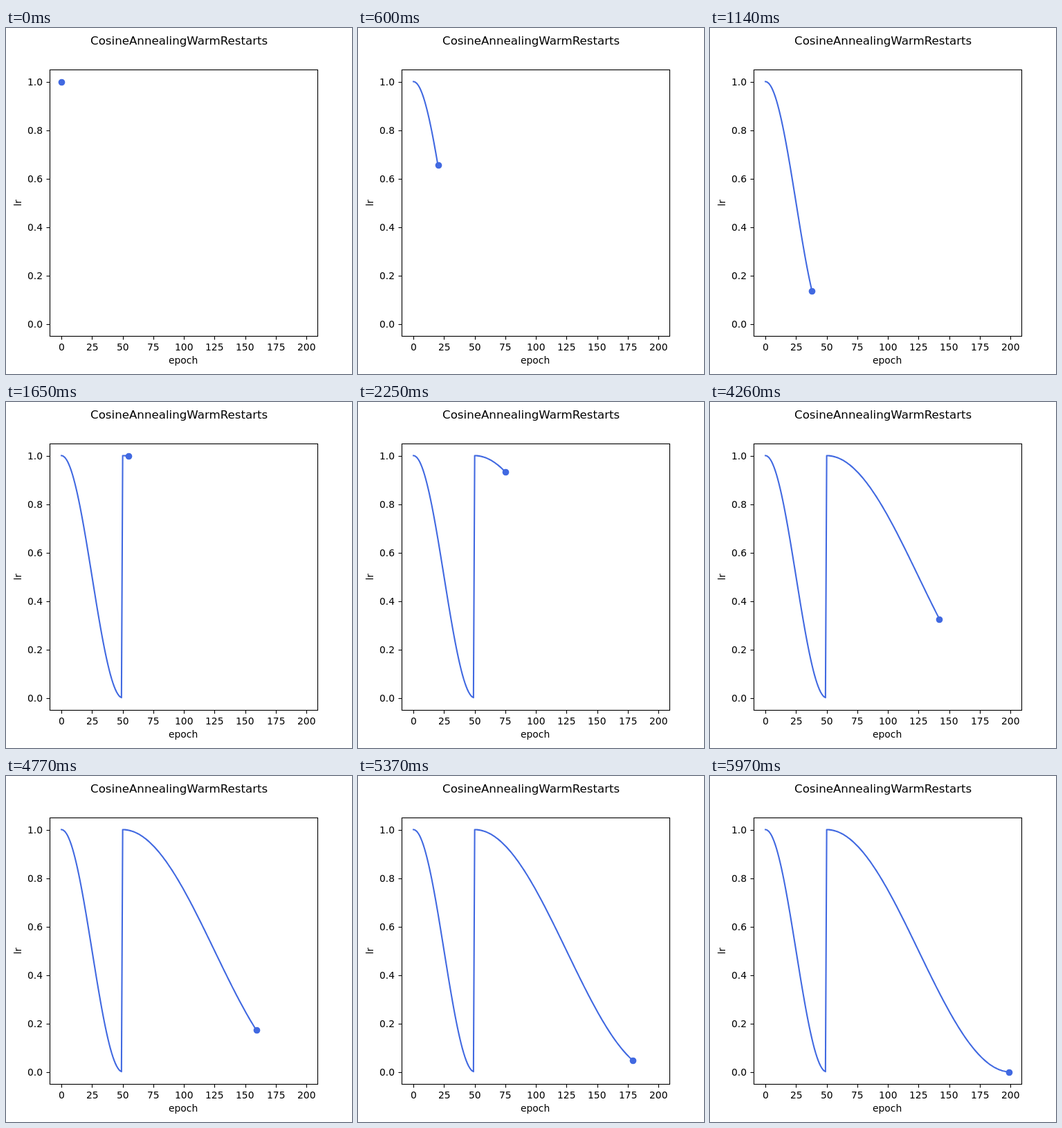
These frames come from a looping animation (500 px wide and 500 px high, 6 s). An HTML page with a canvas:

```html
<!DOCTYPE html>
<html lang="en">
<head>
<meta charset="utf-8">
<title>Learning rate schedule</title>
<style>
  html, body { margin: 0; width: 100%; height: 100%; overflow: hidden; background: #fff; }
  canvas { display: block; }
</style>
</head>
<body>
<canvas id="chart" width="500" height="500"></canvas>
<script>
const ctx = document.getElementById('chart').getContext('2d');
const EPOCHS = 200, STEP = 30, RESTART = 50, PT = 100 / 72;
const BLUE = '#4169e1';
const LEFT = 62.5, RIGHT = 450, TOP = 60, BOTTOM = 445;

// Cosine decay over 50 epochs, then a restart lasting 150
function rate(epoch) {
  const phase = epoch < RESTART ? epoch / RESTART : (epoch - RESTART) / 150;
  return (1 + Math.cos(Math.PI * phase)) / 2;
}

// Data limits plus a 5% margin on every side
const last = EPOCHS - 1, lowest = rate(last);
const px = epoch => LEFT + (RIGHT - LEFT) * (epoch / last + 0.05) / 1.1;
const py = lr => TOP + (BOTTOM - TOP) * ((1 - lr) / (1 - lowest) + 0.05) / 1.1;
const snap = v => Math.floor(v + 0.5 + 1e-6) + 0.5;

// align: 0 = start, 0.5 = centre, 1 = end
function label(text, x, y, align, points = 10) {
  ctx.font = `${points * PT}px "DejaVu Sans", sans-serif`;
  ctx.fillText(text, Math.round(x - align * ctx.measureText(text).width), y);
}

function line(x1, y1, x2, y2) {
  ctx.beginPath();
  ctx.moveTo(x1, y1);
  ctx.lineTo(x2, y2);
  ctx.stroke();
}

function drawAxes() {
  ctx.fillStyle = ctx.strokeStyle = '#000';
  ctx.lineWidth = 0.8 * PT;
  ctx.lineCap = 'butt';
  ctx.lineJoin = 'miter';
  const x = snap(LEFT), y = snap(BOTTOM);
  ctx.strokeRect(x, snap(TOP), snap(RIGHT) - x, y - snap(TOP));

  for (let epoch = 0; epoch <= 200; epoch += 25) {
    const tick = snap(px(epoch));
    line(tick, y, tick, y + 5);
    label(epoch, px(epoch), 466, 0.5);
  }
  for (let i = 0; i <= 5; i++) {
    const tick = snap(py(i / 5));
    line(x - 5, tick, x, tick);
    label((i / 5).toFixed(1), 52.8, Math.round(py(i / 5) + 5.3), 1);
  }

  label('CosineAnnealingWarmRestarts', 250, 24, 0.5, 12);
  label('epoch', (LEFT + RIGHT) / 2, 485, 0.5);
  ctx.save();
  ctx.translate(22, (TOP + BOTTOM) / 2);
  ctx.rotate(-Math.PI / 2);
  label('lr', 0, 0, 0.5);
  ctx.restore();
}

function drawCurve(epoch) {
  ctx.strokeStyle = ctx.fillStyle = BLUE;
  ctx.lineWidth = 1.5 * PT;
  ctx.lineCap = 'square';
  ctx.lineJoin = 'round';
  ctx.beginPath();
  for (let e = 0; e <= epoch; e++) ctx.lineTo(px(e), py(rate(e)));
  ctx.stroke();

  // The marker sits on whole pixels
  ctx.beginPath();
  ctx.arc(snap(px(epoch)), snap(py(rate(epoch))), 3.5 * PT, 0, 2 * Math.PI);
  ctx.fill();
}

function draw(now) {
  ctx.fillStyle = '#fff';
  ctx.fillRect(0, 0, 500, 500);
  drawCurve(Math.floor(now / STEP) % EPOCHS);
  drawAxes();
  requestAnimationFrame(draw);
}
requestAnimationFrame(draw);
</script>
</body>
</html>
```
